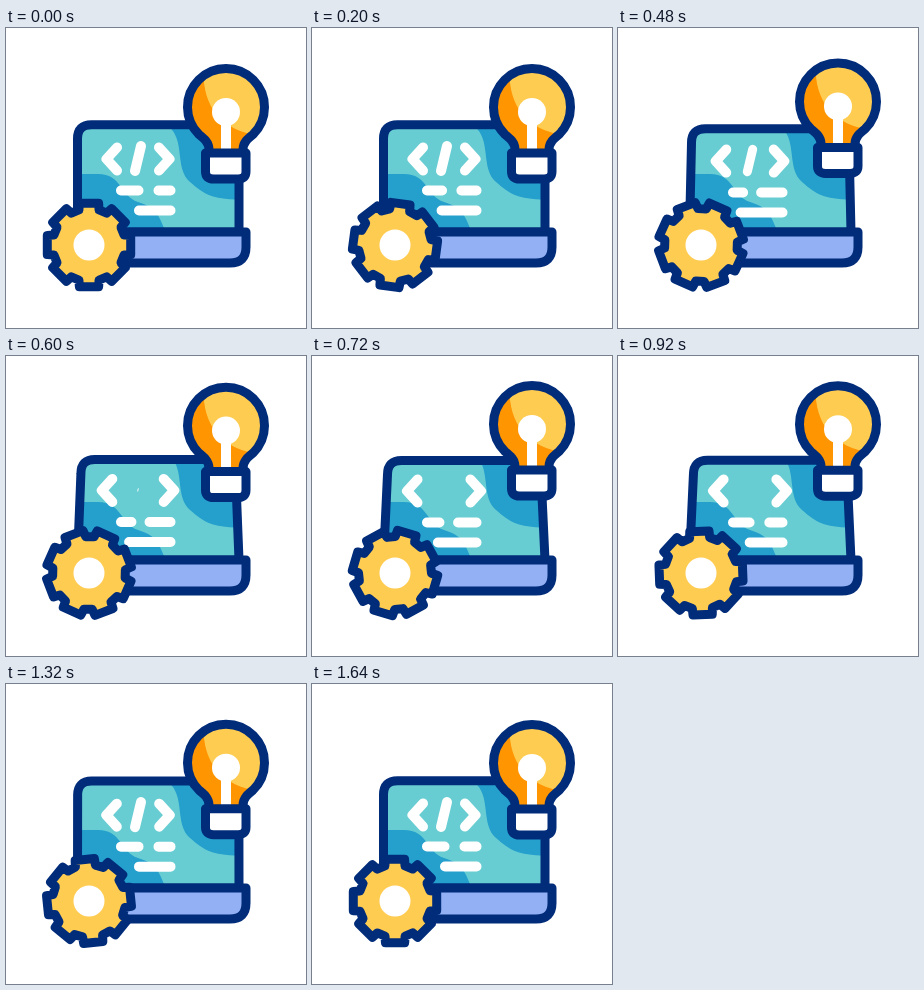
An HTML page for the animation above (1680 ms loop, 300 by 300 pixels).

```html
<!DOCTYPE html>
<html>
<head>
<meta charset="utf-8">
<style>
html, body { margin: 0; width: 100%; height: 100%; overflow: hidden; background: #fff; }
svg { display: block; width: 100vw; height: 100vh; }
.line { stroke: #002c7a; stroke-width: 9; stroke-linejoin: round; stroke-linecap: round; }
.code { stroke: #fff; stroke-width: 10; stroke-linejoin: round; stroke-linecap: round; fill: none; }
</style>
</head>
<body>
<svg viewBox="0 0 300 300">
  <clipPath id="lidClip"><path id="lidShape"/></clipPath>
  <clipPath id="bulbClip"><path id="glass" d="M203 126V120C203 113 198 109 193 105A38.5 38.5 0 1 1 247 105C242 109 237 113 237 120V126Z"/></clipPath>
  <g clip-path="url(#lidClip)">
    <path fill="#68cdd2" d="M60 80H250V215H60Z"/>
    <path fill="#25a0cd" d="M60 146H92C116 146 114 168 132 174S152 184 162 210H60Z"/>
    <path fill="#25a0cd" d="M162 98C180 112 168 140 184 154S206 171 240 172V90Z"/>
  </g>
  <use href="#lidShape" class="line" fill="none"/>
  <path class="line" fill="#92b0f3" d="M72 204H240V219Q240 235 224 235H72Z"/>
  <g id="code" class="code">
    <path id="opening" d="M111 119.500L100.500 131L111 142.500"/>
    <path id="closing" d="M153 119.500L163.500 131L153 142.500"/>
    <path id="slash" d="M3 -12.500L-3 12.500"/>
    <path id="rows"/>
  </g>
  <g id="bulb">
    <g clip-path="url(#bulbClip)">
      <path fill="#ffcc52" d="M170 30H270V130H170Z"/>
      <path fill="#ff9500" d="M170 30H198C194 70 209 101 255 106V130H170Z"/>
    </g>
    <use href="#glass" class="line" fill="none"/>
    <path class="code" stroke-width="9" d="M220 83V120"/>
    <circle cx="220" cy="82.500" r="14" fill="#fff"/>
    <path class="line" fill="#fff" d="M199.500 123.500H240V142Q240 149.500 232 149.500H207.500Q199.500 149.500 199.500 142Z"/>
  </g>
  <path id="gear" class="line" fill="#ffcc52"/>
  <circle cx="83" cy="217" r="15.500" fill="#fff"/>
</svg>
<script>
const LOOP = 1680;
const el = id => document.getElementById(id);
const draw = (id, d) => el(id).setAttribute('d', d);
const move = (id, t) => el(id).setAttribute('transform', t);
const clamp = x => Math.max(0, Math.min(1, x));
const ease = (t, from, to) => (1 - Math.cos(Math.PI * clamp((t - from) / (to - from)))) / 2;
const swing = (t, a, b, c, d) => ease(t, a, b) - ease(t, c, d);

const corners = [];
for (let i = 0; i < 8; i++) {
  for (const [r, offset] of [[36.5, -16], [42.8, -13], [42.8, 13], [36.5, 16]]) {
    const a = (i * 45 + offset) * Math.PI / 180;
    corners.push(`${r * Math.sin(a)} ${-r * Math.cos(a)}`);
  }
}
draw('gear', `M${corners.join('L')}Z`);

function render(t) {
  const lift = swing(t, 240, 720, 880, 1380);
  const shift = 4 * lift, spread = 5.5 * lift;
  const left = 71.5 + shift, right = 233 - shift, top = 96.8 + 7.7 * lift;
  move('bulb', `translate(0 ${1.5 - 11 * lift})`);
  draw('lidShape', `M71.5 204L${left} ${top + 14}Q${left} ${top} ${left + 14} ${top}` +
    `H${right - 14}Q${right} ${top} ${right} ${top + 14}L233 204Z`);

  move('code', `translate(0 ${4 * lift})`);
  move('opening', `translate(${-spread} 0)`);
  move('closing', `translate(${spread} 0)`);
  const size = 1 - swing(t, 440, 640, 920, 1120);
  move('slash', `translate(132 130.5) scale(${size})`);
  el('slash').style.display = size < 0.01 ? 'none' : '';

  const slide = swing(t, 0, 520, 520, 1040);
  draw('rows', `M115 162.5H${132.5 - 7.5 * slide}M${152.5 - 9.5 * slide} 162.5H164.5` +
    `M${133 - 10.5 * slide} 182.5H164.5`);

  const angle = 25 * ease(t, 0, 540) - 34 * ease(t, 540, 1080) + 9 * ease(t, 1080, LOOP);
  move('gear', `translate(83 217) rotate(${angle})`);
}

function frame() {
  render(performance.now() % LOOP);
  requestAnimationFrame(frame);
}
frame();
</script>
</body>
</html>
```
